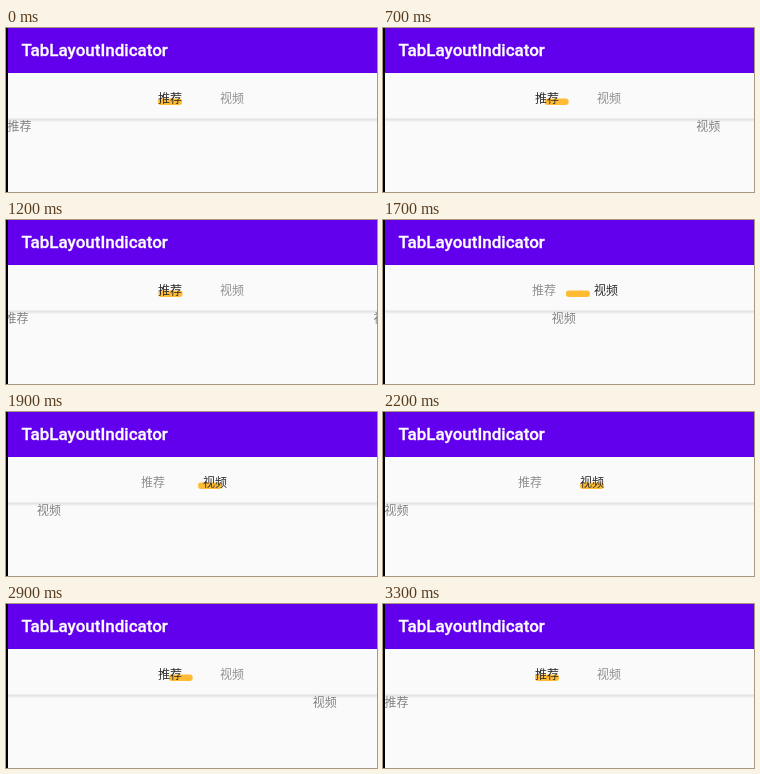
Write an HTML page that moves like this. It is 371 px wide and 164 px high and loops after 4100 ms.

```html
<!DOCTYPE html>
<html lang="zh-CN">
<head>
<meta charset="utf-8">
<title>Tab indicator</title>
<style>
  html, body { margin: 0; width: 100%; height: 100%; overflow: hidden; background: #fafafa; }
  svg { display: block; width: 371px; height: 164px; }
  text { font: 12px "Noto Sans CJK SC", "Noto Sans CJK", sans-serif; fill: #828282; }
  .title { font: 500 17px Roboto, sans-serif; fill: #fff; stroke: #fff; stroke-width: .3px; }
  .tab { fill: #909090; }
  .tab.on { fill: #2c2c2c; }
</style>
</head>
<body>
<svg viewBox="0 0 371 164">
  <defs>
    <linearGradient id="shade" x2="0" y2="1">
      <stop stop-color="#dedede"/>
      <stop offset="1" stop-color="#fafafa"/>
    </linearGradient>
  </defs>
  <rect width="371" height="164" fill="#fafafa"/>
  <rect y="90.5" width="371" height="4" fill="url(#shade)"/>
  <g id="pages">
    <text x="1.5" y="102.8">推荐</text>
    <text x="370.5" y="102.8">视频</text>
  </g>
  <rect width="371" height="45" fill="#6200ee"/>
  <text class="title" x="15.5" y="27.6">TabLayoutIndicator</text>
  <g id="strip">
    <rect id="bar" x="152" y="70.5" width="24" height="6.5" rx="3" fill="#ffbb33"/>
    <text class="tab" x="152" y="74.6">推荐</text>
    <text class="tab" x="214" y="74.6">视频</text>
  </g>
  <rect width="2" height="164" fill="#000"/>
</svg>
<script>
  const LOOP = 4100, TICK = 100, PAGE = 369, GAP = 62, MAX_SCROLL = 17;
  // Pager offset per tick for each gesture; the last value holds.
  const swipes = [
    { at: 700, path: [.155, .56, .4, .18, .05, .008, .003, 0] },
    { at: 1700, path: [.547, .8, .92, .97, .993, 1] },
    { at: 2600, path: [.85, .6, .36, .173, .05, .008, .003, 0] }
  ];
  const $ = id => document.getElementById(id);
  const tabs = document.querySelectorAll('.tab');
  const shift = (el, x) => el.setAttribute('transform', `translate(${x} 0)`);

  function offsetAt(t) {
    const swipe = swipes.filter(s => s.at <= t).pop();
    if (!swipe) return 0;
    const step = Math.floor((t - swipe.at) / TICK);
    return swipe.path[Math.min(step, swipe.path.length - 1)];
  }

  function draw(now) {
    const p = offsetAt(now % LOOP);
    const scroll = Math.min(MAX_SCROLL, Math.max(0, GAP * (p - .5)));
    shift($('pages'), -PAGE * p);
    shift($('strip'), -Math.round(scroll));
    shift($('bar'), GAP * p);
    tabs.forEach((tab, i) => tab.classList.toggle('on', i === Math.round(p)));
  }

  const start = performance.now();
  function frame() {
    draw(performance.now() - start);
    requestAnimationFrame(frame);
  }
  frame();
</script>
</body>
</html>
```
